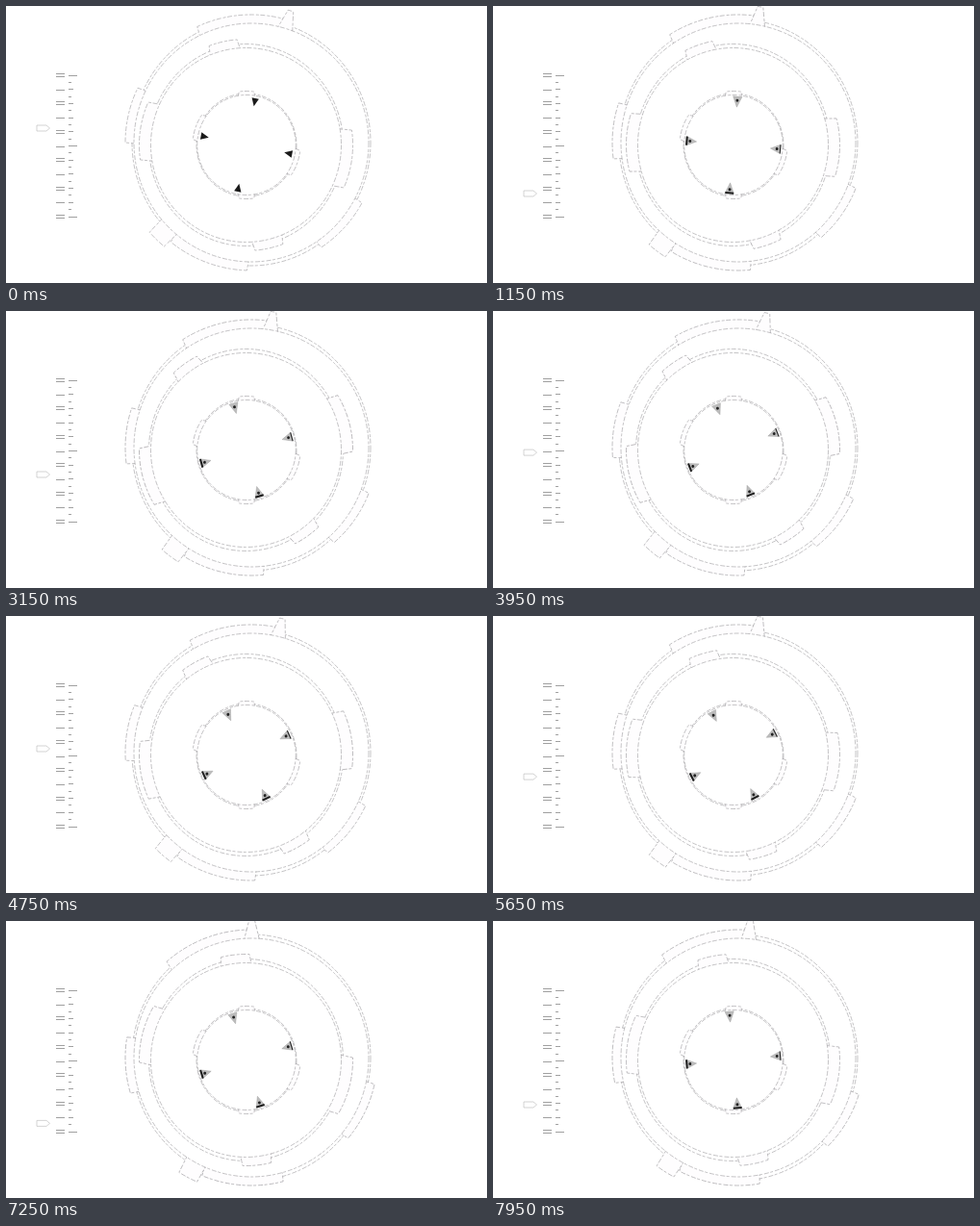
These frames come from a looping animation (500x288 px, 8 s). An HTML page:

```html
<!DOCTYPE html>
<html lang="en">
<head>
<meta charset="utf-8">
<title>Rotating dial</title>
<style>
  html, body { margin: 0; width: 100%; height: 100%; overflow: hidden; background: #fff; }
  svg { display: block; width: 500px; height: 288px; }
  .ring { fill: #fff; stroke: #9c9a9e; stroke-width: .6; stroke-dasharray: 5 2 3 1.5; }
  .tooth { fill: #fefdfe; }
  .tick { fill: none; stroke: #a0a0a0; shape-rendering: crispEdges; }
  .pointer { fill: none; stroke: #b8b8b8; stroke-width: .6; }
</style>
</head>
<body>
<svg viewBox="0 0 500 288">
  <path id="ticks" class="tick"/>
  <path id="pointer" class="pointer" d="M32 -3H42L45.5 0L42 3H32Z"/>
  <g id="rings"></g>
  <g id="marks"></g>
</svg>
<script>
const LOOP = 8000;
const $ = id => document.getElementById(id);

function polar(r, deg) {
  const a = deg * Math.PI / 180;
  return `${(r * Math.cos(a)).toFixed(2)} ${(r * Math.sin(a)).toFixed(2)}`;
}

// Raised segment: top radius, start and end angle, lean of the sides.
// Its foot stays hidden under the ring's hole.
function tooth(base, [top, from, to, lean]) {
  return `<path class="ring tooth" d="M${polar(base, from - lean)}L${polar(top, from)}` +
    `A${top} ${top} 0 0 1 ${polar(top, to)}L${polar(base, to + lean)}"/>`;
}

// A rim of height r, slightly narrower than tall, with turning teeth around a hole.
function addRing(id, cx, cy, r, squeeze, gap, teeth) {
  const oval = (rx, ry) => `<ellipse class="ring" cx="${cx}" cy="${cy}" rx="${rx}" ry="${ry}"/>`;
  const base = r - squeeze - gap;
  $('rings').innerHTML += oval(r - squeeze, r) +
    `<g id="${id}" transform="translate(${cx} ${cy})">${teeth.map(t => tooth(base, t)).join('')}</g>` +
    oval(r - squeeze - gap / 2, r - gap);
}

// Repeats teeth on the opposite side.
const mirrored = teeth =>
  [...teeth, ...teeth.map(([top, from, to, lean]) => [top, from + 180, to + 180, lean])];

addRing('outer', 255, 142, 128, 4, 4, [
  [131, 28.6, 56.3, .5], [131, 180, 205.7, .5],
  [133, 92, 129, 1], [141, 130, 138.6, 1],
  [133, 245, 286, 1], [143, 285.5, 287.8, 3]
]);
addRing('middle', 249.5, 144.5, 105, 4, 4, mirrored([[111, -8, 23.6, 2], [110, 69.6, 85.1, 2]]));
addRing('hub', 250, 144.5, 53.5, 1.5, 1.5, mirrored([[56, 6, 34, 2], [56, 82, 98, 2]]));

// Scale: boxed and single strokes on the left, short divisions on the right.
let scale = '';
for (let i = 0; i <= 10; i++) {
  const y = Math.round(72 + i * 14.7) + .5;
  scale += i % 2 ? `M52 ${y}h9` : i === 5 ? '' : `M52 ${y - 2}h9M52 ${y + 1}h9`;
}
for (let i = 0; i <= 20; i++) {
  const y = Math.floor(72 + i * 7.35) + .5;
  scale += `M65 ${y}h${i % 10 ? (i % 2 ? 3 : 5) : 9}`;
}
$('ticks').setAttribute('d', scale);

// Four inward-pointing markers, each with a light and a dark look.
let light = '', dark = '';
for (let i = 0; i < 4; i++) {
  const turn = `<g transform="rotate(${i * 90})">`;
  const bar = Math.min(i, 2);
  light += turn + '<path d="M-4.8 -50.5H4.8L0 -39.5Z" fill="#bdbdbd" stroke="#999" stroke-width=".4"/>' +
    `<path d="M-4.5 -50H4.5" stroke="#1c1c1c" stroke-width="${bar}"/>` +
    '<circle cy="-46.5" r="1.5" fill="#222"/></g>';
  dark += turn + '<path d="M-3.8 -49.5H3.8L0 -41Z" fill="#1a1a1a"/></g>';
}
$('marks').innerHTML = `<g id="light">${light}</g><g id="dark">${dark}</g>`;

// Key poses; the curve between them is smooth.
const times = [0, 1150, 2050, 3150, 4750, 6550, 7200, 7950];
const poses = {
  outer: [0, -7.4, -11.5, -7.4, -3.6, -13.1, -16.5, -11.6],
  middle: [0, -6.4, -13.8, -22.8, -16.3, 8.5, 7, 1],
  marks: [11, 5, -4, -16, -25, -27, -18, -5],
  pointer: [127, 195, 203, 170, 138, 205, 211, 191]
};

function at(v, t) {
  const end = times.length - 1;
  let i = 0;
  while (i < end - 1 && t >= times[i + 1]) i++;
  const slope = j => {
    const a = Math.max(j - 1, 0), b = Math.min(j + 1, end);
    return (v[b] - v[a]) / (times[b] - times[a]);
  };
  const h = times[i + 1] - times[i], u = (t - times[i]) / h, w = 1 - u;
  return v[i] * w * w * (1 + 2 * u) + v[i + 1] * u * u * (3 - 2 * u) +
    h * u * w * (slope(i) * w - slope(i + 1) * u);
}

const place = (id, transform) => $(id).setAttribute('transform', transform);

const start = performance.now();
function draw(now) {
  // The dial moves ten times a second, offset by half a step.
  const step = Math.floor((Math.max(0, now - start) % LOOP + 50) / 100);
  const t = Math.max(0, step * 100 - 50);
  place('outer', `translate(255 142) rotate(${at(poses.outer, t)})`);
  place('middle', `translate(249.5 144.5) rotate(${at(poses.middle, t)})`);
  place('marks', `translate(250 144.5) scale(.975 1) rotate(${at(poses.marks, t)})`);
  place('pointer', `translate(0 ${at(poses.pointer, t)})`);
  const blink = step % 22;
  $('dark').style.display = blink < 2 ? '' : 'none';
  $('light').style.display = blink >= 2 && blink < 19 ? '' : 'none';
  requestAnimationFrame(draw);
}
draw(start);
</script>
</body>
</html>
```
